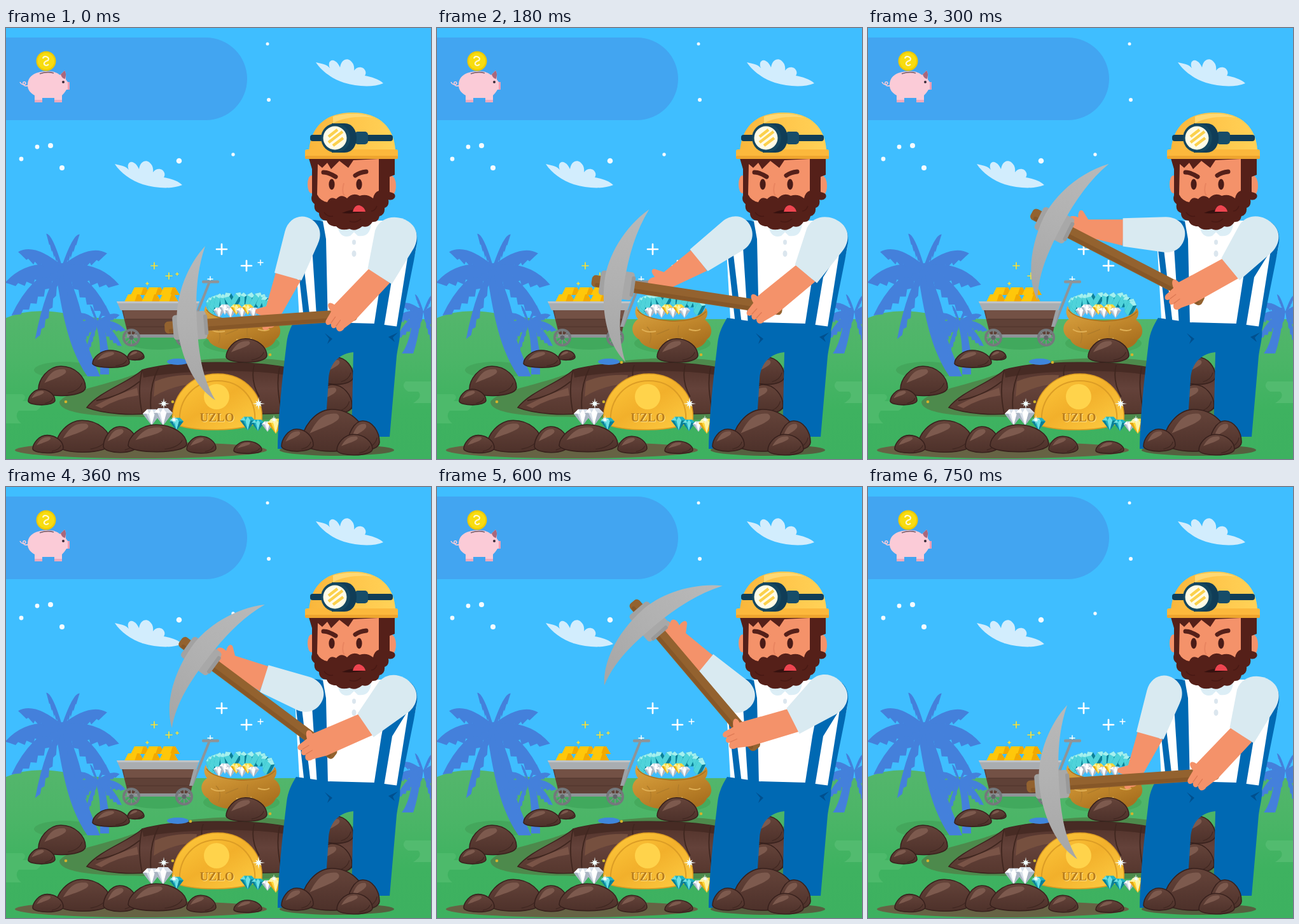
An HTML page for the animation above (780 ms loop, 668 px wide and 678 px high).

```html
<!DOCTYPE html>
<html lang="en">
<head>
<meta charset="utf-8">
<title>Miner</title>
<style>
html, body { margin: 0; width: 100%; height: 100%; overflow: hidden; background: #3fbeff; }
svg { display: block; width: 100vw; height: 100vh; }
</style>
</head>
<body>
<svg id="stage" viewBox="0 0 668 678" xmlns="http://www.w3.org/2000/svg"></svg>
<script>
const LOOP = 780, STEP = 30;

// ---- drawing helpers ----
const path = (d, fill, extra = '') => `<path d="${d}" fill="${fill}" ${extra}/>`;
const line = (d, stroke, w, extra = '') =>
  `<path d="${d}" fill="none" stroke="${stroke}" stroke-width="${w}" ${extra}/>`;
const oval = (x, y, rx, ry, fill, extra = '') =>
  `<ellipse cx="${x}" cy="${y}" rx="${rx}" ry="${ry}" fill="${fill}" ${extra}/>`;
const dot = (x, y, r, fill, extra) => oval(x, y, r, r, fill, extra);
const rect = (x, y, w, h, fill, r = 0) =>
  `<rect x="${x}" y="${y}" width="${w}" height="${h}" rx="${r}" fill="${fill}"/>`;
const each = (list, fn) => list.map(a => fn(...a)).join('');
const repeat = (n, fn) => Array.from({ length: n }, (_, i) => fn(i)).join('');
const grad = (id, colors, dir = 'x2="0" y2="1"') => `<linearGradient id="${id}" ${dir}>` +
  colors.map((c, i) => `<stop offset="${i / (colors.length - 1)}" stop-color="${c}"/>`).join('') + '</linearGradient>';
const plus = (x, y, s, c) =>
  line(`M${x - s} ${y}h${2 * s}M${x} ${y - s}v${2 * s}`, c, Math.max(1.5, s / 3), 'stroke-linecap="round"');

let seed = 7;
const random = () => (seed = seed * 16807 % 2147483647) / 2147483647;

const LEAF = '#4480db';

function frond(cx, cy, qx, qy, tx, ty, w) {
  const n = 7, dx = (cx + tx) / 2 - qx, dy = (cy + ty) / 2 - qy, len = Math.hypot(dx, dy);
  const at = (t, off) => {
    const u = 1 - t, k = off * w * Math.sin(Math.PI * t) ** 0.7 / len;
    return [u * u * cx + 2 * u * t * qx + t * t * tx + dx * k,
            u * u * cy + 2 * u * t * qy + t * t * ty + dy * k].map(v => v.toFixed(1)).join(' ');
  };
  let d = `M${cx} ${cy}Q${qx} ${qy} ${tx} ${ty}`;
  for (let i = n - 1; i > 0; i--) d += `L${at((i + 0.6) / n, 0.75)}L${at(i / n, 1)}`;
  return path(d + 'Z', LEAF);
}

// Fronds fan out from the top of the trunk, their tips on a lowered ring.
function crown(cx, cy, r) {
  return repeat(10, i => {
    const a = (118 + i * 34) * Math.PI / 180;
    const tx = cx + r * Math.cos(a), ty = cy + r * (.4 + Math.sin(a));
    return frond(cx, cy, cx + .62 * (tx - cx), cy + .5 * (ty - cy) - .28 * r, tx, ty, r * .33);
  });
}

function rock(x, y, rx, ry = rx * .6) {
  const p = (a, b) => `${(x + a * rx).toFixed(1)} ${(y + b * ry).toFixed(1)}`;
  return path(`M${p(-1, .5)}C${p(-1, -.1)} ${p(-.6, -1)} ${p(-.05, -1)}C${p(.55, -1)} ${p(1, -.3)} ${p(1, .4)}` +
      `C${p(.95, 1.1)} ${p(-.9, 1.1)} ${p(-1, .5)}Z`, 'url(#rock)', 'stroke="#38211d" stroke-width="1.6"') +
    path(`M${p(-.75, .1)}C${p(-.5, -.6)} ${p(-.3, -.85)} ${p(.1, -.8)}C${p(.4, -.5)} ${p(-.3, -.2)} ${p(-.75, .1)}Z`, '#7d5a4e') +
    line(`M${p(.25, .75)}Q${p(.75, .6)} ${p(.85, .1)}`, '#3f2721', 1.2);
}

function gem(x, y, s, [light, mid, dark]) {
  const p = (a, b) => `${x + a * s} ${y + b * s}`;
  return path(`M${p(-1, -.3)}L${p(-.5, -.8)}L${p(.5, -.8)}L${p(1, -.3)}L${p(0, 1)}Z`, mid) +
    path(`M${p(-1, -.3)}L${p(-.5, -.8)}L${p(-.3, -.3)}ZM${p(-.3, -.3)}L${p(0, -.8)}L${p(.35, -.3)}L${p(0, 1)}Z`, light) +
    path(`M${p(.35, -.3)}L${p(1, -.3)}L${p(0, 1)}ZM${p(-1, -.3)}L${p(-.6, -.3)}L${p(0, 1)}Z`, dark);
}

function crystal(x, y, s, rot) {
  return `<g transform="translate(${x} ${y}) rotate(${rot}) scale(${s})">` +
    path('M-7-8L0-14L7-8V10L0 14L-7 10Z', '#19a5b8') + path('M-7-8L0-14L2-6V12L0 14L-7 10Z', '#4fd3da') +
    path('M-7-8L0-14L7-8L2-5Z', '#a5f0ef') + path('M2-5L7-8V10L2 12Z', '#0d7f97') + '</g>';
}

function glint(x, y, s) {
  const points = Array.from({ length: 16 }, (_, i) => {
    const r = i % 2 ? s * .3 : i % 4 ? s * .65 : s, a = i * Math.PI / 8;
    return `${(x + r * Math.cos(a)).toFixed(1)} ${(y + r * Math.sin(a)).toFixed(1)}`;
  });
  return path(`M${points.join('L')}Z`, '#f2ffff');
}

const TEAL = ['#6fe0e4', '#22b3c3', '#0c7f96'];
const CLEAR = ['#ffffff', '#d7dfe8', '#a9b4c2'];
const AMBER = ['#fff2a0', '#ffd93b', '#e3a413'];

// ---- scenery ----
const defs = '<defs>' +
  grad('land', ['#54b66c', '#4bb567', '#3eb260', '#3db160']) +
  grad('rock', ['#65443a', '#593a32', '#4d312a']) +
  grad('gold', ['#ffcb3d', '#f2b02b', '#ffcf45'], 'x2="1" y2="1"') +
  grad('sack', ['#dca644', '#c68c2f', '#a9701f'], 'x2=".6" y2="1"') +
  grad('pit', ['#4f3028', '#64423a', '#56372e']) +
  grad('hat', ['#f9b63c', '#ffc64b', '#ffd257'], 'x2="1" y2="0"') +
  grad('steel', ['#b9b9b9', '#b1b1b1', '#a6a6a6']) +
  '</defs>';

const CLOUD = 'M171 214C180 216 188 217 193 223C189 214 195 208 201 212C205 214 207 218 209 222' +
  'C211 210 219 207 225 211C230 215 232 220 231 227C236 220 246 220 249 228C250 231 249 233 248 235' +
  'C258 237 270 240 277 247C260 254 235 252 215 246C197 240 180 228 171 214Z';

function sky() {
  return rect(0, 0, 668, 678, '#3fbeff') + rect(-80, 15, 459, 130, '#42a5f1', 65) +
    each([[411, 25, 2.5], [413, 113, 3], [49, 187, 3.4], [70, 185, 4], [24, 206, 3.4], [88, 220, 4],
      [272, 209, 4.3], [357, 199, 2.7]], (x, y, r) => dot(x, y, r, '#f4fbff')) +
    path(CLOUD, '#d2edfd') + path(CLOUD, '#d2edfd', 'transform="translate(316 -160)"');
}

function piggy() {
  const pink = '#fbcbd7';
  return line('M36 90q-7 3-9-2q-1-4 3-3q3 3-2 4q-4 0-6-4', pink, 1.6) +
    path('M34 90C34 74 48 68 66 68C76 68 81 71 85 74L92 67C95 71 94 77 94 81L97 85H100V97H95C92 102 90 104 88 106V116H76V110H57V116H45V106C38 102 34 97 34 90Z', pink) +
    path('M86 73L92 67C95 71 94 76 93 80Q88 80 86 73Z', '#a9677c') +
    rect(45, 113, 12, 4, '#eea9bd') + rect(76, 113, 12, 4, '#eea9bd') + rect(97, 85, 3, 12, '#ee9db3') +
    dot(90, 85, 2, '#3b2b39') + line('M53 72q12-4 22-1', '#7c6372', 1.8) +
    dot(63, 52, 15.5, '#edc900') + dot(63, 52, 13, '#f8dc10') +
    line('M58 48q1-4 5-3q6 2 3 6q-7 2-6 6q3 4 7 0', '#fff8d0', 2.2);
}

function land() {
  return path('M0 456Q40 438 100 450Q140 458 200 458H668V678H0Z', 'url(#land)') +
    path('M0 576H26Q34 580 26 587H52Q60 594 48 602H20Q12 612 24 622H0Z', '#4dba6b') +
    path('M668 556H628Q620 564 632 572H648Q656 580 640 590H668Z', '#52bb6f') +
    oval(92, 538, 48, 13, '#44a75c') + oval(240, 492, 52, 14, '#41a95d') + oval(370, 496, 60, 16, '#46aa5d') +
    path('M84 588C95 570 170 560 214 540C280 515 420 514 470 530L560 535V606C470 616 330 622 250 612C180 612 84 612 84 588Z', '#4d8a4c');
}

function palms() {
  return path('M76 372C86 430 94 500 128 548H148C122 490 104 430 100 368Z', LEAF) + crown(88, 374, 90) +
    path('M140 462C150 490 148 520 148 545H162C162 510 158 484 152 460Z', LEAF) + crown(144, 461, 44) +
    path('M640 440C640 470 632 500 622 512H640C648 490 652 460 652 440Z', LEAF) + crown(656, 446, 48);
}

function cart() {
  const bar = (x, y) => path(`M${x} ${y + 12}L${x + 6} ${y}H${x + 24}L${x + 31} ${y + 12}Z`, '#ffc70a') +
    path(`M${x + 20} ${y}H${x + 24}L${x + 31} ${y + 12}H${x + 16}Z`, '#f2a900');
  const wheel = x => dot(x, 487, 12, 'none', 'stroke="#74787c" stroke-width="4"') +
    line(`M${x - 11} 487h22M${x} 476v22M${x - 8} 479l16 16M${x + 8} 479l-16 16`, '#83878a', 1.6) + dot(x, 487, 3.5, '#62666a');
  return line('M292 470L320 399', '#8e9498', 4) + rect(308, 397, 27, 4.5, '#8e9498', 2) +
    repeat(6, i => bar(i < 3 ? 196 + 23 * i : 186 + 27 * (i - 3), i < 3 ? 408 : 419)) +
    path('M182 443H298L290 483H192Z', '#5f4137') + path('M184 443H296L294 458H187Z', '#735145') +
    line('M188 458H293M190 470H291', '#4f352d', 1.2) + path('M174 430H304L299 444H180Z', '#a9adb1') +
    path('M174 430H304L303 433H175Z', '#c0c4c7') + path('M295 444H301L293 470H288Z', '#9da2a6') +
    rect(190, 482, 98, 5, '#8f9498') + wheel(197) + wheel(280);
}

function sack() {
  const pile = repeat(14, i => {
    const a = Math.PI * (1 - i / 13);
    return crystal(368 + 45 * Math.cos(a), 437 - 15 * Math.sin(a) + 6 * random(), .75 + .25 * random(), 70 * (random() - .5));
  });
  return pile +
    repeat(7, i => gem(335 + i * 9, 447 - 5 * (i % 2), 9, i === 3 || i === 5 ? AMBER : CLEAR)) +
    path('M314 437C318 454 345 460 368 460C394 460 418 454 422 440C428 446 424 456 421 459C434 468 434 484 424 490' +
      'C418 505 398 508 370 507C345 508 322 502 318 490C304 482 304 466 316 458C311 452 310 444 314 437Z', 'url(#sack)') +
    line('M315 443C325 462 402 470 423 446', '#a87220', 1.6) +
    line('M330 470q10 10 4 26M380 468q-4 18 6 30M345 482l20-8', '#b07c2b', 1.4) +
    line('M322 474q8 6 22 3M362 490q14 4 24-2M396 474q12 4 18 0', '#e0b056', 2);
}

function pit() {
  return path('M127 597C146 572 196 556 214 538C270 522 390 524 440 534L548 540V598C500 606 300 612 240 604C200 612 150 606 127 597Z',
      'url(#pit)', 'stroke="#3c241e" stroke-width="1.6"') +
    path('M214 538C270 522 390 524 440 534V546C380 536 280 538 216 550Z', '#472b24') +
    line('M214 538Q206 570 214 606M240 534Q224 565 228 604M310 530Q304 545 312 560M390 530Q384 556 398 580M430 534Q424 560 432 598M142 586Q180 580 210 556', '#3f261f', 1.8) +
    path('M140 594Q170 578 206 566L208 578Q176 582 150 598Z', '#7a5447') + path('M234 556Q262 544 300 546L298 560Q260 562 232 580Z', '#76503f') +
    rock(520, 540, 26, 22) + rock(514, 585, 30, 24) + oval(270, 525, 17, 5, '#3f86dc') +
    each([[415, 514], [290, 526], [262, 588], [94, 588]], (x, y) => dot(x, y, 2.3, '#d3b32c')) +
    each([[165, 521, 29, 14], [204, 515, 13], [88, 556, 37, 24], [56, 581, 21], [378, 508, 32]], rock);
}

function coin() {
  const label = (x, y, c) => `<text x="${x}" y="${y}" fill="${c}">UZLO</text>`;
  return path('M262 622C258 580 288 544 333 544C378 544 406 580 402 618C370 636 296 636 262 622Z', 'url(#gold)', 'stroke="#db9a22" stroke-width="1.5"') +
    line('M273 622C270 584 296 555 333 555C370 555 394 584 391 620', '#dc9d25', 2) +
    dot(331, 580, 20, '#ffd34b') +
    '<g font-family="\'Liberation Serif\', serif" font-weight="700" font-size="19" text-anchor="middle">' +
    label(332.5, 620, '#ffe48a') + label(331.5, 619, '#b97d1d') + '</g>';
}

function gems() {
  return each([[229, 611, 14, CLEAR], [247, 610, 15, CLEAR], [268, 622, 11, TEAL],
      [380, 621, 12, TEAL], [396, 624, 10, TEAL], [411, 626, 9, CLEAR], [424, 625, 13, AMBER]], gem) +
    each([[248, 591, 9], [264, 616, 7], [397, 591, 10], [421, 616, 7]], glint);
}

function frontRocks() {
  return oval(212, 664, 198, 13, '#666344') + oval(520, 664, 90, 9, '#55603f') +
    each([[122, 643, 43], [66, 655, 24], [180, 648, 27, 21], [238, 646, 46, 22], [307, 656, 23], [380, 660, 22, 10],
      [515, 634, 50, 34], [562, 642, 25, 24], [458, 649, 25, 18], [548, 656, 28]], rock);
}

// ---- miner ----
function body() {
  const blue = '#0069b3';
  return path('M453 315Q462 302 490 303H600C634 302 648 322 645 345L616 474H462Z', '#ffffff') +
    path('M448 325C446 306 470 298 498 304L503 332L506 468H489L481 345Z', blue) +
    path('M455 340H464L479 466H469Z', blue) +
    path('M596 302C622 294 650 306 646 338L641 366L619 476H613L633 350L607 392L594 470H578L590 392L600 340Z', blue) +
    path('M456 456L505 463L580 465L618 470C622 482 616 500 614 516L603 643H543L546 510C522 512 508 530 507 552L500 662H427C428 600 437 530 441 496C443 478 450 466 456 456Z', blue) +
    path('M501 480L513 489L505 497L508 489Z', '#00508f') + path('M616 479L601 486L611 494L608 487Z', '#00508f') +
    path('M521 310Q524 332 541 327L547 321L553 327Q572 330 574 308Z', '#dceef6') +
    oval(547, 337, 3, 4, '#dbe6ee') + oval(547, 355, 3.5, 5, '#dbe6ee');
}

function head() {
  const skin = '#f4926a', hair = '#552019', navy = '#103d57';
  return oval(480, 246, 6, 14, skin) + oval(605, 248, 8, 16, skin) +
    path('M476 205H611V231L603 234V258Q614 260 611 267Q607 272 601 270Q603 280 595 283Q596 294 587 296Q585 306 576 305Q570 315 560 312' +
      'Q549 321 540 316Q526 320 519 312Q507 312 504 303Q492 302 492 291Q483 288 485 277Q478 272 481 263V222Z', hair) +
    path('M490 214L497 220L505 212L511 222L524 209L538 220L546 208L586 206V256Q579 258 577 268Q567 260 556 264Q545 258 536 268' +
      'Q527 260 519 269Q509 264 505 274Q494 272 489 262Z', skin) +
    oval(512, 246, 4.6, 8.5, '#4a1b17') + oval(555, 246, 4.6, 8.5, '#4a1b17') +
    line('M499 227Q507 227 518 234M549 232Q556 227 566 226', hair, 7, 'stroke-linecap="round"') +
    line('M531 244Q527 258 532 264', '#e98560', 2) +
    path('M528 291Q540 286 546 286Q548 277 556 279Q564 282 565 289Q545 293 528 291Z', '#35110f') +
    path('M545 289Q548 277 556 279Q564 282 565 289Z', '#ee4550') +
    line('M500 290q6 8 14 6M540 304q10 4 18-4M574 288q6 0 9-8', '#481914', 1.5) +
    path('M476 194C479 155 502 133 545 133C587 133 611 157 612 194Z', 'url(#hat)') +
    path('M514 139C530 134 560 132 578 141C560 138 530 140 514 150Z', '#ffd873') +
    rect(470, 191, 146, 15, '#fcb83c', 3) + rect(470, 201, 146, 5, '#eea42f', 2) +
    rect(478, 168, 130, 10, navy, 4) + rect(548, 163, 21, 20, '#174d69', 5) +
    path('M512 150H532C545 150 551 162 551 173C551 184 545 196 532 196H512Z', navy) +
    dot(518, 173, 23, '#15475f') + dot(517, 173, 18.5, '#fffbe6') +
    line('M507 171l14-11M507 180l22-17M514 185l16-12', '#fbd14d', 4.5);
}

const rearArm =
  path('M398 323L344 341L332 331C326 329 325 335 328 343C318 341 311 347 317 353C308 355 311 364 319 364C321 371 331 371 346 368L408 363Z', '#f4926a') +
  path('M395 322L458 299C478 292 497 303 497 324C497 341 485 351 470 353L409 364Z', '#d9eaf1');

const frontArm =
  path('M571 379L517 436C509 430 502 435 512 447L504 461C502 468 508 470 512 466C511 473 517 475 520 471C521 480 529 480 533 473L551 459L604 401Z', '#f4926a') +
  line('M512 465l7-10M520 470l7-10', '#dd7a55', 1.3) +
  path('M569 379L580 319C587 298 612 292 632 304C648 314 649 333 640 348L607 403Z', '#d9eaf1');

const pick =
  '<g transform="rotate(.8)">' + rect(-72, -7, 303, 19, '#93622f', 6) + rect(-66, 5, 292, 6, '#865728', 3) + '</g>' +
  rect(-59, -17, 30, 39, '#a2a2a2', 5) + rect(-34, -20, 28, 44, '#a8a8a8', 5) + rect(-10, -14, 6, 32, '#999999', 2) +
  path('M2-121.5C-32-90-53-40-52 0C-51 45-36 95-2 121.5C-20 85-22 45-21 0C-20-45-14-85 2-121.5Z', 'url(#steel)');

// ---- motion ----
const SHOULDER = { x: 468, y: 328 };
const REACH = 142, REAR_REST = 170.5, GRIP = 197;

const mix = (a, b, k) => a + (b - a) * k;
const swing = (t, from, to) => {
  const u = Math.min(1, Math.max(0, (t - from) / (to - from)));
  return (1 - Math.cos(Math.PI * u)) / 2;
};

// Raised slowly, brought down fast.
const lift = t => swing(t, 10, 560) - swing(t, 570, 750);

// The rear hand slides along the handle, one arm's length from its shoulder.
function rearAngle(x, y, a, k) {
  const c = Math.cos(a), s = Math.sin(a), off = -22 * Math.sqrt(k);
  const dx = SHOULDER.x - x, dy = SHOULDER.y - y;
  const along = dx * c + dy * s, gap = dy * c - dx * s - off;
  const u = along - Math.sqrt(Math.max(0, REACH ** 2 - gap ** 2));
  const hx = u * c - off * s - dx, hy = u * s + off * c - dy;
  return Math.atan2(hy, hx) * 180 / Math.PI;
}

const stage = document.getElementById('stage');
stage.innerHTML = defs + sky() + piggy() + land() + palms() +
  each([[339, 348, 8, '#fff'], [378, 374, 8, '#fff'], [400, 369, 4, '#fff'], [321, 395, 4, '#fff'], [233, 374, 5, '#ffe02e'],
    [256, 390, 5, '#ffe02e'], [269, 387, 2, '#ffe02e'], [222, 402, 2, '#ffe02e']], plus) +
  cart() + sack() + pit() + coin() + gems() + body() +
  `<g id="rear">${rearArm}</g>` + head() + frontRocks() +
  `<g id="pick">${pick}</g><g id="front">${frontArm}</g>`;

const part = id => document.getElementById(id);
const rear = part('rear'), front = part('front'), tool = part('pick');

function draw(now) {
  const k = lift(Math.floor((now % LOOP) / STEP) * STEP);
  const turn = mix(-4.7, 52.8, k), a = turn * Math.PI / 180;
  const x = mix(517.6, 480.5, k) - GRIP * Math.cos(a) + 3 * Math.sin(a);
  const y = mix(451, 379.5, k) - GRIP * Math.sin(a) - 3 * Math.cos(a);
  tool.setAttribute('transform', `translate(${x} ${y}) rotate(${turn})`);
  front.setAttribute('transform', `rotate(${mix(0.5, 33, k)} 615 328)`);
  rear.setAttribute('transform', `rotate(${rearAngle(x, y, a, k) - REAR_REST} ${SHOULDER.x} ${SHOULDER.y})`);
}

let start = null;
function tick(now) {
  if (start === null) start = now;
  draw(now - start);
  requestAnimationFrame(tick);
}
draw(0);
requestAnimationFrame(tick);
</script>
</body>
</html>
```
